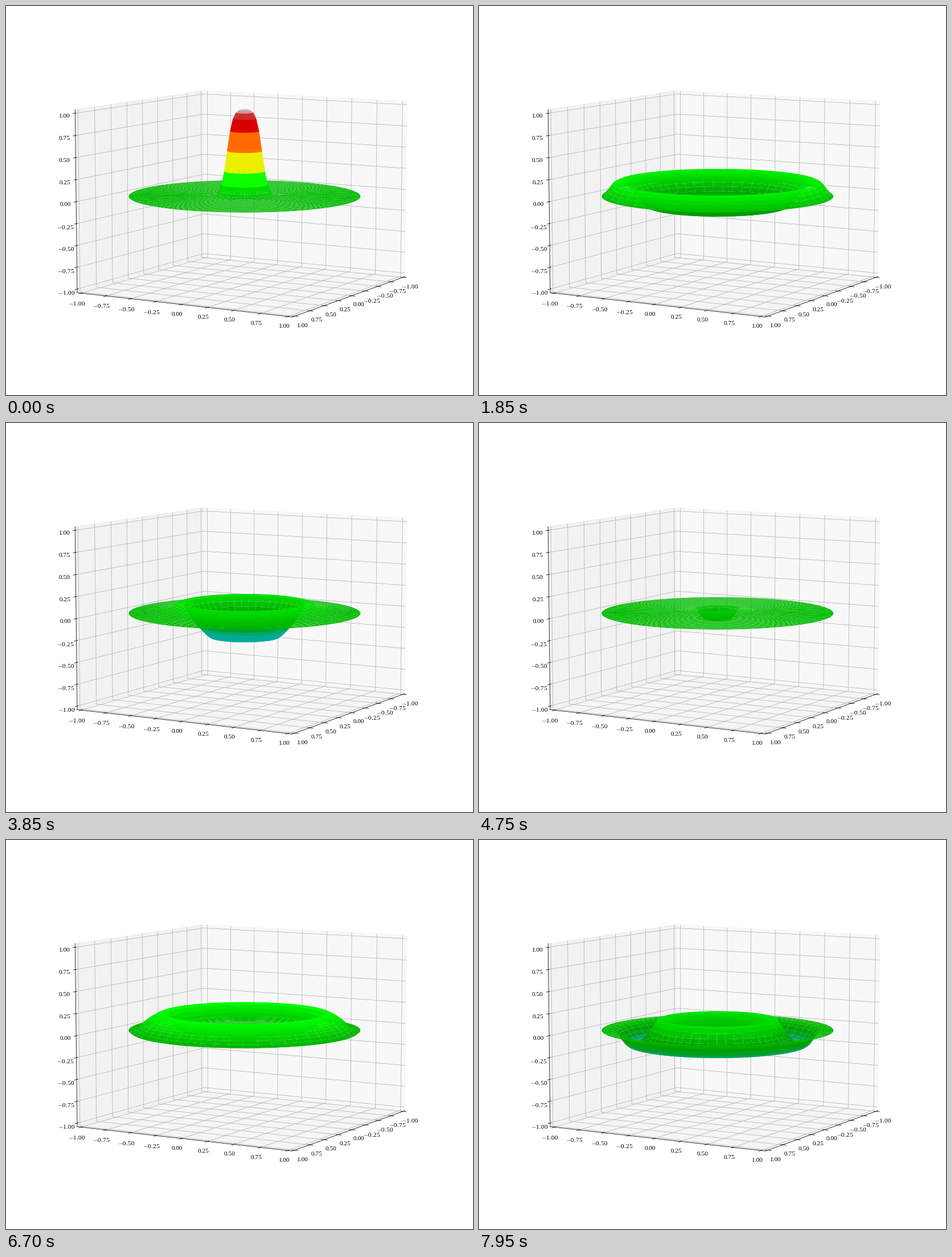
These frames come from a looping animation (820x683 px, 8000 ms). A matplotlib script:

```python
import numpy as np
import matplotlib.pyplot as plt
from matplotlib.animation import FuncAnimation
from matplotlib.collections import PolyCollection
from matplotlib.ticker import MultipleLocator
from mpl_toolkits.mplot3d import proj3d

W, H, DPI = 820, 683, 205 / 3
FRAMES, INTERVAL = 160, 50
STEP = 0.02094          # distance the wave travels per frame
RINGS, SECTORS = 40, 49
MODES = 40

plt.rcParams.update({
    "font.family": "Liberation Serif",
    "font.size": 12,
    "mathtext.fontset": "cm",
})

# Bessel functions from their integral forms
theta = (np.arange(200) + 0.5) * np.pi / 200


def j0(x):
    return np.cos(np.asarray(x)[..., None] * np.sin(theta)).mean(-1)


def j1(x):
    s = np.sin(theta)
    return (s * np.sin(np.asarray(x)[..., None] * s)).mean(-1)


def bessel_zeros(count):
    b = np.pi * (np.arange(1, count + 1) - 0.25)
    z = b + 1 / (8 * b)
    for _ in range(4):
        z = z + j0(z) / j1(z)
    return z


def bump(r):
    return 0.5 * (1 - np.tanh((r - 0.1515) / 0.05))


# Expand the starting bump in the modes of a disc with a fixed rim
k = bessel_zeros(MODES)
fine = np.linspace(0, 1, 601)
coef = 2 * (j0(np.outer(k, fine)) * bump(fine) * fine).sum(1) / 600 / j1(k) ** 2

radius = np.linspace(0, 1, RINGS + 1)
angle = np.linspace(0, 2 * np.pi, SECTORS + 1)
shapes = coef[:, None] * j0(np.outer(k, radius))
X = np.outer(radius, np.cos(angle))
Y = np.outer(radius, np.sin(angle))


def height(t):
    return np.cos(k * t) @ shapes


def label(v, _pos=None):
    return ("$-$" if v < 0 else "") + f"{abs(v):.2f}"


fig = plt.figure(figsize=((W + 1e-6) / DPI, (H + 1e-6) / DPI), dpi=DPI,
                 facecolor="white")
pad = 1.08 * 12 * DPI / 72
ax = fig.add_axes([pad / W, pad / H, 1 - 2 * pad / W, 1 - 2 * pad / H],
                  projection="3d")
ax.view_init(elev=8, azim=30)
lim = (-25 / 24, 25 / 24)
ax.set(xlim=lim, ylim=lim, zlim=lim)
for axis in (ax.xaxis, ax.yaxis, ax.zaxis):
    axis.set_major_locator(MultipleLocator(0.25))
    axis.set_major_formatter(label)
view = ax.get_proj()


def corners(a):
    """Four corner values of every grid cell."""
    quad = (a[:-1, :-1], a[:-1, 1:], a[1:, 1:], a[1:, :-1])
    return np.stack(quad, axis=-1).reshape(-1, 4)


def surface(frame):
    Z = np.repeat(height(frame * STEP)[:, None], SECTORS + 1, axis=1)
    flat = proj3d.proj_transform(X.ravel(), Y.ravel(), Z.ravel(), view)
    px, py, depth = (corners(np.asarray(p).reshape(Z.shape)) for p in flat)
    order = np.argsort(-depth.mean(1), kind="stable")
    cells = np.stack([px, py], axis=-1)[order]
    return cells, corners(Z).mean(1)[order]


cells, level = surface(0)
sheet = PolyCollection(cells, array=level, cmap="nipy_spectral",
                       norm=plt.Normalize(-1, 1), transform=ax.transData,
                       zorder=2)
fig.add_artist(sheet)


def update(frame):
    cells, level = surface(frame)
    sheet.set_verts(cells)
    sheet.set_array(level)
    return [sheet]


anim = FuncAnimation(fig, update, frames=FRAMES, interval=INTERVAL,
                     repeat=True, repeat_delay=0, blit=False)
plt.show()
```
